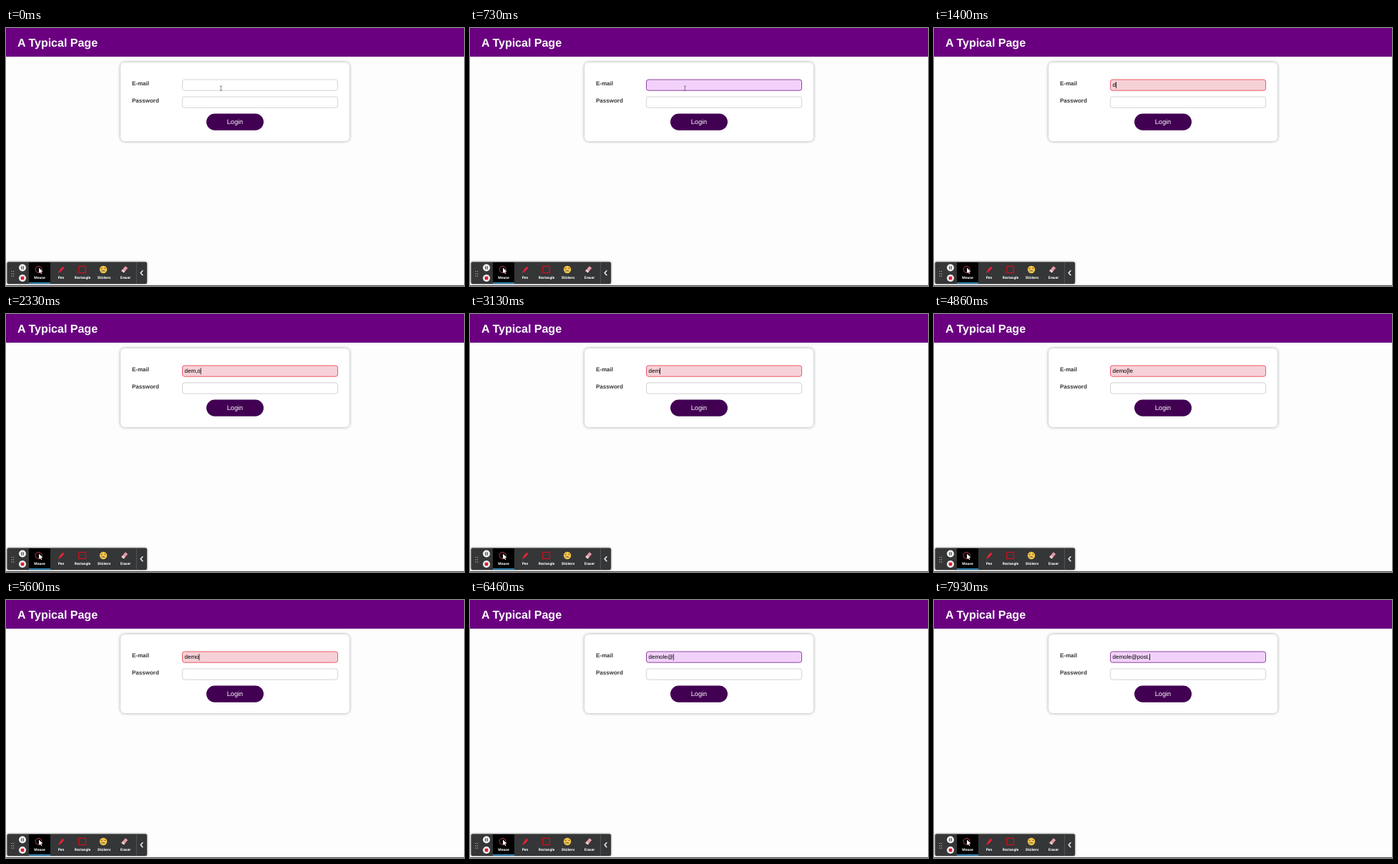
Write an HTML page that moves like this. It is 640 px wide and 360 px high and loops after 8000 ms.

```html
<!DOCTYPE html>
<html lang="en">
<head>
<meta charset="utf-8">
<title>A Typical Page</title>
<style>
  html, body { margin: 0; width: 100%; height: 100%; overflow: hidden; background: #fdfdfd; }
  svg { display: block; width: 640px; height: 360px; font-family: "Liberation Sans", Arial, sans-serif; text-rendering: geometricPrecision; }
  .card { fill: #fff; filter: drop-shadow(0 .5px 2px rgba(0, 0, 0, .36)); }
  .label { font-size: 8px; font-weight: 700; fill: #383838; }
  .input { fill: #fff; stroke: #cfcfcf; stroke-width: .9; }
  .input.focus { fill: #f2d2fa; stroke: #84309a; }
  .input.invalid { fill: #f6d1d8; stroke: #ec4853; }
  .value { font-size: 8px; white-space: pre; }
  .tools text { font: 700 5px Roboto, "Liberation Sans", sans-serif; fill: #fff; text-anchor: middle; }
  .bar { fill: #353637; filter: drop-shadow(0 0 1.5px rgba(0, 0, 0, .5)); }
</style>
</head>
<body>
<svg viewBox="0 0 640 360">
  <rect width="640" height="360" fill="#fdfdfd"/>
  <rect width="640" height="40" fill="#6a0080"/>
  <text x="16" y="25.5" font-size="16" font-weight="700" fill="#fff">A Typical Page</text>

  <rect class="card" x="160" y="48" width="320" height="110" rx="6"/>
  <text class="label" x="176" y="80.3">E-mail</text>
  <text class="label" x="176" y="104.3">Password</text>
  <rect id="email" class="input" x="246.5" y="72" width="217" height="15.2" rx="3"/>
  <rect class="input" x="246.5" y="96" width="217" height="15.2" rx="3"/>
  <text id="value" class="value" x="249.5" y="82.4"></text>
  <rect id="caret" x="249.5" y="75.2" width=".8" height="9"/>
  <path id="pointer" d="M298.8 80.8q1.4 0 1.6 1q.2-1 1.6-1M300.4 81.8v4.6M298.8 87.4q1.4 0 1.6-1q.2 1 1.6 1" fill="none" stroke="#555" stroke-width=".7"/>
  <rect x="280" y="119.5" width="80" height="23.2" rx="11.6" fill="#420052"/>
  <text x="320" y="134" font-size="9.2" fill="#fff" text-anchor="middle">Login</text>

  <rect y="359" width="640" height="1" fill="#454545"/>
  <g class="tools">
    <rect class="bar" x="1.5" y="326.5" width="195.5" height="30.5" rx="2"/>
    <path d="M8 339v8M10.6 339v8" stroke="#bbb" stroke-width="1.1" stroke-dasharray="1.1 2.2"/>
    <circle cx="23" cy="334.5" r="5" fill="#f1f1f1"/>
    <path d="M21.8 332.3v4.4M24.2 332.3v4.4" stroke="#333" stroke-width="1.1"/>
    <circle cx="23" cy="349" r="5" fill="#f1f1f1"/>
    <rect x="20.7" y="346.7" width="4.6" height="4.6" rx=".6" fill="#d9202f"/>

    <rect x="32" y="327" width="30" height="29.5" fill="#000"/>
    <rect x="32" y="355" width="30" height="1.6" fill="#3a9bd6"/>
    <circle cx="45.6" cy="337" r="4.5" fill="none" stroke="#c44049" stroke-width="1"/>
    <path d="M46 334.5v7.6l1.8-1.6 1.2 2.5 1.2-.6-1.2-2.4h2.4z" fill="#fff"/>
    <text x="47" y="350.2">Mouse</text>

    <path d="M73.2 341.8l1-3.4 5-5.6 2.2 2-5 5.6z" fill="#e32636"/>
    <path d="M74.6 338.6l2 1.8" stroke="#7c0d18" stroke-width=".8"/>
    <text x="77" y="350.2">Pen</text>

    <rect x="101.7" y="332.5" width="9.6" height="9" fill="none" stroke="#d3101c" stroke-width="1.2"/>
    <text x="107" y="350.2">Rectangle</text>

    <circle cx="136" cy="337" r="5.2" fill="#f7c644"/>
    <path d="M132.7 335.6l2-.5M137.3 335.1l2 .5M133.8 339.4q2.2-1.6 4.4 0" fill="none" stroke="#573916" stroke-width=".9"/>
    <path d="M132.4 337.4h2v2.5h-2z" fill="#65b8e8"/>
    <text x="137" y="350.2">Stickers</text>

    <path d="M161.2 339l5.6-6.7 3.4 2.6-5.6 6.7z" fill="#e59aa9"/>
    <path d="M161.2 339l1.8-2.1 3.4 2.6-1.8 2.1z" fill="#f3cbd2"/>
    <text x="167" y="350.2">Eraser</text>

    <path d="M182.3 327v29.5" stroke="#626262" stroke-width=".7"/>
    <path d="M191.3 338.3l-3.2 3.5 3.2 3.5" fill="none" stroke="#fff" stroke-width="1.3"/>
  </g>
</svg>
<script>
  const LOOP = 8000, BLINK = 530, FOCUS = 200;

  // [time, field content]
  const steps = [
    [FOCUS, ''],
    [1330, 'd'], [1660, 'de'], [1800, 'dem'], [1930, 'dem,'], [2330, 'dem,o'],
    [2930, 'dem,'], [3130, 'dem'], [3460, 'demo'], [3730, 'demo['], [4060, 'demo[l'], [4330, 'demo[le'],
    [5260, 'demo[l'], [5400, 'demo['], [5600, 'demo'], [5800, 'demol'], [6000, 'demole'],
    [6460, 'demole@'], [7060, 'demole@p'], [7200, 'demole@po'], [7330, 'demole@pos'],
    [7600, 'demole@post'], [7930, 'demole@post.']
  ];

  const [email, value, caret, pointer] =
    ['email', 'value', 'caret', 'pointer'].map(id => document.getElementById(id));
  const show = (node, on) => node.setAttribute('visibility', on ? 'visible' : 'hidden');

  function draw(time) {
    const step = steps.filter(([at]) => at <= time).pop();
    const [since, text] = step || [0, ''];
    const invalid = text && !text.includes('@');

    if (value.textContent !== text) value.textContent = text;
    email.setAttribute('class', 'input' + (step ? invalid ? ' invalid' : ' focus' : ''));
    caret.setAttribute('x', 249.5 + (text ? value.getComputedTextLength() : 0));
    show(caret, step && Math.floor((time - since) / BLINK) % 2 === 0);
    show(pointer, !text);
  }

  const start = performance.now();
  function tick() {
    draw((performance.now() - start) % LOOP);
    requestAnimationFrame(tick);
  }
  tick();
</script>
</body>
</html>
```
